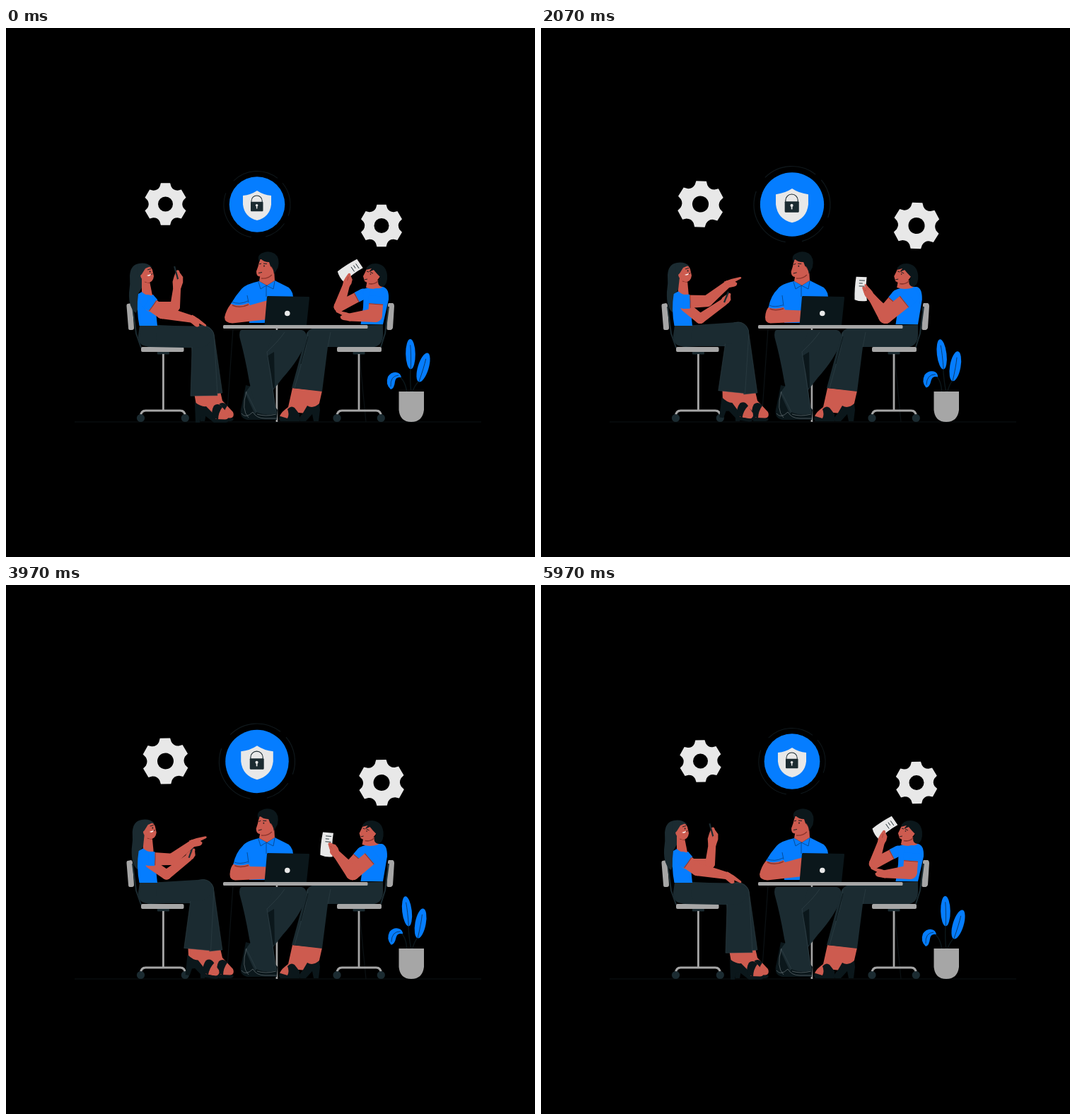
Animation of 748x748 px, one loop 6.01 s. Source, as an HTML page with a canvas:

```html
<!DOCTYPE html>
<html lang="en">
<head>
<meta charset="utf-8">
<title>Security meeting</title>
<style>
html, body { margin: 0; width: 100%; height: 100%; overflow: hidden; background: #000; }
canvas { display: block; width: 748px; height: 748px; }
</style>
</head>
<body>
<canvas id="stage"></canvas>
<script>
const LOOP = 6010, HALF = LOOP / 2, SIZE = 748;
const BLUE = '#057dff', SKIN = '#cd5b4f', SHADE = '#8c342c', SLATE = '#1b2b31', DARK = '#0b171b';
const GREY = '#a6a6a6', LIGHT = '#e8e8e8', SEAM = '#35464c', FAINT = '#0c1215';

const canvas = document.getElementById('stage');
const c = canvas.getContext('2d');
const ratio = window.devicePixelRatio || 1;
canvas.width = canvas.height = SIZE * ratio;

const rad = deg => deg * Math.PI / 180;
const wave = x => (1 - Math.cos(2 * Math.PI * x)) / 2;

function fill(color, d) {
  c.fillStyle = color;
  c.fill(new Path2D(d));
}

function line(color, width, d) {
  c.strokeStyle = color;
  c.lineWidth = width;
  c.stroke(new Path2D(d));
}

function oval(color, x, y, rx, ry = rx) {
  c.fillStyle = color;
  c.beginPath();
  c.ellipse(x, y, rx, ry, 0, 0, 7);
  c.fill();
}

function bar(color, x, y, w, h, r = 0) {
  c.fillStyle = color;
  c.beginPath();
  c.roundRect(x, y, w, h, r);
  c.fill();
}

// Draws in a local frame: moved, turned, scaled.
function at(x, y, deg, draw, sx = 1, sy = sx) {
  c.save();
  c.translate(x, y);
  c.rotate(rad(deg));
  c.scale(sx, sy);
  draw();
  c.restore();
}

function spin(x, y, deg, draw) {
  at(x, y, deg, () => { c.translate(-x, -y); draw(); });
}

// Tapered capsule between two joints.
function limb(color, [ax, ay], ra, [bx, by], rb) {
  const a = Math.atan2(by - ay, bx - ax), q = Math.PI / 2;
  c.fillStyle = color;
  c.beginPath();
  c.arc(ax, ay, ra, a + q, a + 3 * q);
  c.arc(bx, by, rb, a - q, a + q);
  c.fill();
}

function sleeve([sx, sy], [ex, ey], len, r) {
  at(sx, sy, Math.atan2(ey - sy, ex - sx) * 180 / Math.PI, () => {
    oval(BLUE, 0, 0, r);
    bar(BLUE, 0, -r, len, 2 * r);
    line(SHADE, 1, `M${len + .6} ${-r + 1}V${r - 1}`);
  });
}

// Pose between three keys, carried a little past the last one.
const STOPS = [0, .335, .725, 1];
function pose(u, keys) {
  const all = [...keys, keys[2].map((v, i) => v + (v - keys[1][i]) * .35)];
  const i = u < STOPS[1] ? 0 : u < STOPS[2] ? 1 : 2;
  const k = (u - STOPS[i]) / (STOPS[i + 1] - STOPS[i]);
  return all[i].map((v, j) => v + (all[i + 1][j] - v) * k);
}

function gear(x, y, deg, scale) {
  at(x, y, deg, () => {
    const p = (r, a) => `${r * Math.sin(rad(a))} ${-r * Math.cos(rad(a))}`;
    let d = '';
    for (let a = 0; a < 360; a += 60) {
      d += `${a ? 'L' : 'M'}${p(30.4, a - 12.5)}L${p(30.4, a + 12.5)}L${p(26, a + 18)}`;
      d += `Q${p(22, a + 30)} ${p(26, a + 42)}`;
    }
    fill(LIGHT, d + 'Z');
    oval('#000', 0, 0, 10.5);
  }, scale);
}

function badge(scale) {
  at(355, 249.5, 0, () => {
    c.strokeStyle = '#10191d';
    c.lineWidth = 1;
    for (const [from, to] of [[-135, -52], [-40, 20], [35, 75], [100, 200]]) {
      c.beginPath();
      c.arc(0, 0, 47, rad(from), rad(to));
      c.stroke();
    }
    oval(BLUE, 0, 0, 39.3);
    fill(LIGHT, 'M0 -19.500Q-9 -13.500 -20 -12.500V0Q-18 18 0 22.500Q18 18 20 0V-12.500Q9 -13.500 0 -19.500Z');
    line(SLATE, 1, 'M-8 -3V-5A7.6 7.6 0 0 1 7.2 -5V-3');
    bar(SLATE, -9, -3.8, 17.5, 13.6, 1);
    oval(LIGHT, -.4, 1.2, 1.8);
    bar(LIGHT, -1.1, 1.5, 1.5, 4.5);
  }, scale);
}

function plant(u) {
  const leaf = (x, y, deg, rx, ry) => at(x, y, deg, () => {
    oval(BLUE, 0, 0, rx, ry);
    line(DARK, .6, `M0 ${-ry * .6}Q1 0 0 ${ry}`);
  });
  spin(573, 514, -8 * u, () => {
    line(DARK, 1.4, 'M573 516Q571 500 572 482');
    leaf(572, 461, -1, 6.8, 21.3);
  });
  spin(574, 514, -9.5 * u, () => {
    line(DARK, 1.4, 'M574 516Q578 505 584 499');
    leaf(590, 480, 17, 7.6, 21.3);
  });
  spin(566, 514, 9 * u, () => {
    line(DARK, 1.4, 'M567 517Q565 497 553 491');
    fill(BLUE, 'M544 511Q536 504 540 493Q545 486 552 487Q558 488 559 494Q551 493 550 500Q549 510 544 511Z');
    line(DARK, .6, 'M544 507Q543 492 555 491');
  });
  fill(GREY, 'M555.5 514H591V540Q589 557 573 557Q557 557 555.5 540Z');
}

function chair(x, left, right, seatX, seatW) {
  bar(SLATE, x - 8.5, 457, 17, 4.5, 1);
  bar(GREY, x - 1.4, 461, 2.8, 80);
  line(GREY, 3, `M${left} 549Q${left} 541 ${left + 7} 541H${right - 7}Q${right} 541 ${right} 549`);
  oval(SLATE, left, 551.5, 5.6);
  oval(SLATE, right, 551.5, 5.6);
  bar(GREY, seatX, 451, seatW, 7, 2);
}

function pointing() {
  fill(SKIN, 'M-4 -5L7 -5L20 -3.5Q22.5 -2 20 -.8L11 .5L13 3Q12 7 7 6.5L-3 5Z');
}

function palm() {
  fill(SKIN, 'M-4 -5L5 -7L12 -6L20 -4Q23 -1 18 1L13 6L6 7L-4 5Z');
  line(SHADE, .6, 'M8 -1L15 -2');
}

function sandal(x, y, deg) {
  at(x, y, deg, () => {
    fill(SKIN, 'M-14 -4L16 -4L19 9L34 25Q37 32 30 34L16 33L0 20L-11 13Z');
    fill(DARK, 'M-13 9Q-4 16 3 15L12 24L17 33.500H34Q36 37 31 38H14L0 27L-4 28L-6 38H-12Z');
    fill(DARK, 'M14 14Q20 9 26 16Q20 24 20 34L12 30Q10 21 14 14Z');
  });
}

function trouser(knee, r, ankle, half) {
  const a = Math.atan2(ankle[1] - knee[1], ankle[0] - knee[0]);
  const dx = -Math.sin(a), dy = Math.cos(a);
  const p = (q, k) => `${q[0] + dx * k} ${q[1] + dy * k}`;
  const d = `M${p(ankle, half)}L${p(knee, r)}A${r} ${r} 0 0 1 ${p(knee, -r)}L${p(ankle, -half)}Z`;
  fill(SLATE, d);
  line(SEAM, .5, d);
}

function leftWoman(u, v) {
  fill(GREY, 'M172 390L177 389Q179 390 179 393L181 424Q181 427 178 427H175Q173 427 173 424L170.5 393Q170.5 390 172 390Z');
  line(SLATE, 2, 'M179 394L184 432L191 452');
  chair(222.4, 190.5, 253.3, 191, 60.5);

  const knee = [279 - 2 * v, 437 - 18 * v], ankle = [280 - 33 * v, 520 - 17 * v];
  sandal(287, 518, 0);
  trouser([278, 437], 16.5, [287, 518], 19);
  sandal(...ankle, 27 * v);
  fill(SLATE, 'M189 420H215L260 422L268 450H200Q187 450 187 435Z');
  limb(SLATE, [204, 436], 15, knee, 15.5);
  trouser(knee, 15.5, ankle, 19);
  limb(SLATE, [225, 436 - 3 * v], 13, [knee[0] - 4, knee[1]], 14.5);

  const headX = 5.5 * u, headY = -1.5 * u;
  c.save();
  c.translate(headX, headY);
  fill(SLATE, `M188 333Q176 335 175 350Q176 362 174 374Q173 396 ${184 - 3 * u} 403Q190 391 187 376L195 362L198 345L206 338Q199 331 188 333Z`);
  c.restore();

  fill(BLUE, `M${187 + u} 376L${194 + u} 372Q203 378 208 377L214 384L212 402L214 421H188.5Q184 398 ${187 + u} 376Z`);
  c.save();
  c.translate(headX, headY);
  fill(SKIN, `M192 354L203 358L${207 - 3 * u} 378Q${199 - 3 * u} 380 ${192 - 3 * u} 373Z`);
  line(SHADE, 1.2, 'M196 359L203 360.5');
  fill(SKIN, 'M192 340Q203 333 207 342L209 351Q208 360 200 360Q191 357 190 350Z');
  fill(SLATE, 'M186 335Q196 331 204 337L197 340L192 348L187 353Z');
  line(DARK, .9, 'M200 342L205 340.5M207 347L205.5 349');
  oval(DARK, 203.6, 344.5, .9);
  fill('#fff', 'M199 350L205 348Q204 352 199 350Z');
  c.restore();

  const farElbow = pose(u, [[239, 394], [240, 399], [225, 411]]);
  const farWrist = pose(u, [[242, 365], [252, 375], [258, 388]]);
  limb(SKIN, [204, 394], 7, farElbow, 7);
  limb(SKIN, farElbow, 7, farWrist, 5.2);
  const [px, py, qx, qy, turn] = pose(u, [[238, 337, 243, 355, -82], [257, 350, 256, 369, -70], [265, 373, 259, 388, -46]]);
  at(...farWrist, turn, palm, 1.08 - .45 * u, 1.05 - .3 * u);
  line(SLATE, 2.2, `M${px} ${py}L${qx} ${qy}`);

  const shoulder = [200 + 2 * u, 387];
  const elbow = pose(u, [[221, 402], [231, 402], [235, 386]]);
  const wrist = pose(u, [[264, 412], [266, 387], [264, 362]]);
  const [aim] = pose(u, [[32], [-6], [-20]]);
  const thick = 9.2 - 1.5 * u;
  limb(SKIN, shoulder, 9.5, elbow, thick);
  limb(SKIN, elbow, thick, wrist, 5);
  at(...wrist, aim, pointing);
  sleeve(shoulder, elbow, 9, 10);
}

function man(u) {
  fill(DARK, 'M339 505L333 535Q328 551 341 554H383L384 540L360 510Z');
  fill(SLATE, 'M350 427H418Q427 429 424 443Q417 466 391 495L370 522L352 546L338 516L350 500Z');
  fill(DARK, 'M366 466L379 458L380 508L374 512Z');
  fill(SLATE, 'M333 427H378L369 458L375 490L382 545Q367 549 354 543L344 500Q338 465 330.5 438Q329 428 333 427Z');
  line(SEAM, .6, 'M369 458Q386 442 394 430M369 458L374 490L382 544M340 515L354 543');
  line('#667176', .7, 'M340 514Q332 540 343 551M333 545Q339 553 349 543Q354 552 366 552H383M355 546Q367 550 382 546');

  const sx = 2.5 * u;
  const cuffL = `${318 + 5 * u} ${390 + 7 * u}`, cuffR = `343 ${389 + 8 * u}`;
  fill(BLUE, `M358 358Q339 362 ${333 + sx} 369Q325 378 ${cuffL}L${cuffR}L344 417H369V380H406Q405 368 394 364L380 357L369 364Z`);
  fill(SKIN, `M${cuffL}Q${311 + 9 * u} 399 ${309 + 11 * u} 409Q${309 + 11 * u} 417 ${320 + 6 * u} 417.5L370 ${412 + 5 * u}V${385 + 20 * u}L345 ${392 + 9 * u}L${cuffR}Z`);
  fill(BLUE, `M${333 + sx} 372L${cuffL}Q330 ${395 + 5 * u} ${cuffR}V372Z`);
  line(SHADE, 1.6, `M${320 + 5 * u} ${392 + 7 * u}Q331 ${397 + 5 * u} 343 ${391 + 8 * u}`);
  fill(SKIN, 'M360 346L379 341L380 357L369 364L358 358Z');
  line('#08376c', .7, `M341 378L343 ${388 + 7 * u}M${319 + 5 * u} ${387 + 7 * u}Q330 ${392 + 5 * u} 342 ${386 + 8 * u}M368 364V380M357 359L360 369L368 364L378 369L380 358`);
  line(SHADE, 1.4, 'M361 354Q370 355 376 349');
  spin(370, 354, -3 * u, () => {
    fill(SKIN, 'M359 327L356.5 337L354 344Q354 350 357 351Q366 354 374 349L380 337L376 326Z');
    fill(DARK, 'M358 331Q354 321 363 318Q371 314 380 319Q388 325 384.5 339L379 348Q378 339 374 337L372 331Q364 331 360 326Z');
    line(DARK, .9, 'M358 334L361 333M364 333L369 333.5M357 346.5L362 345.5');
    oval(DARK, 365, 336.5, .9);
    line(SHADE, .7, 'M375 337L377 341');
  });
}

function rightLegs() {
  fill(SKIN, 'M405 509L447 513L442 535L424 545L414 544L404 549L396 553L387 549Q389 543 399 536Z');
  fill(DARK, 'M398 539Q403 533 408 537L415 546V556H388Q384 552 388 549L398 552Q401 546 398 539Z');
  fill(DARK, 'M413 553Q421 544 426 534Q434 539 443 531L444 540L442 556H435L433 546L424 556H416Z');
  fill(SLATE, 'M533 419L433 425Q424 427 422 443L404 509L447 514L455 451H521Q534 448 533 430Z');
  line(SEAM, .5, 'M455 451L459 430M427 430L424 452L408 509');
  line(DARK, 1, 'M427 436L417 475');
}

function rightWoman(u) {
  fill(GREY, 'M541 389H547Q549 390 549 393L547 424Q546 427 544 427H540Q538 426 538.5 423L540 392Q540 390 541 389Z');
  line(SLATE, 2, 'M541 394L536 432L530 451');
  chair(499, 468, 530.3, 468, 63);

  const farShoulder = [505 - 2 * u, 376 + 2 * u];
  const farElbow = pose(u, [[471, 394], [484, 391], [485, 400]]);
  const farWrist = pose(u, [[481, 364], [473, 373], [466, 380]]);
  const [px, py, tilt, hand] = pose(u, [[486.5, 342.5, 56, -68], [466, 352.5, 25, -105], [452.5, 369, 2, -122]]);
  limb(SKIN, farShoulder, 7, farElbow, 7.5);
  at(px, py, tilt, () => {
    fill(LIGHT, 'M-7.5 -17H7.5Q6 0 9 16.5Q0 18.5 -8.5 15.5Q-9.5 0 -7.5 -17Z');
    line(SLATE, .9, 'M-3 -12H5M-3 -8H2M-3 -4H5');
  });
  limb(SKIN, farElbow, 7.5, farWrist, 5);
  at(...farWrist, hand, palm, .85);
  sleeve(farShoulder, farElbow, 10, 7.5);

  fill(BLUE, `M${506 - 5 * u} ${369 + u}L515 366H${533 - 2 * u}Q${542 - 4 * u} 368 ${541 - 3 * u} 384L533 419H501.5L505 395Z`);
  c.save();
  c.translate(-8 * u, 0);
  fill(SKIN, 'M511 356L531 357L532 367Q520 371 509 367Z');
  line(SHADE, 1.6, 'M513 361.5Q521 363 526 358');
  fill(SKIN, 'M511 338L508 345L505 351L507 358Q514 363 524 358L530 350L523 337Z');
  fill(DARK, 'M509 342Q511 333 523 333Q537 334 539 349Q540 362 533 366Q526 366 526 358L529 352Q523 346 520 342L513 345L517 340Z');
  line(DARK, .9, 'M510 344L513 345M507 356L511 355M515 345L519 347');
  oval(DARK, 515.5, 348, .8);
  c.restore();

  const shoulder = [524 - 2 * u, 379 + u];
  const elbow = pose(u, [[522, 406], [513, 402], [487, 408]]);
  const wrist = pose(u, [[486, 409], [478, 397], [468, 381]]);
  const [aim] = pose(u, [[198], [217], [236]]);
  limb(SKIN, shoulder, 10, elbow, 10);
  limb(SKIN, elbow, 10, wrist, 5.5);
  at(...wrist, aim, pointing, 1, -1);
  sleeve(shoulder, elbow, 11, 11);
}

function draw(t) {
  const u = wave((t - 40) / HALF);
  const v = t > HALF / 2 && t < LOOP - HALF / 2 ? wave(t / HALF - .5) : 0;
  c.setTransform(ratio, 0, 0, ratio, 0, 0);
  c.fillStyle = '#000';
  c.fillRect(0, 0, SIZE, SIZE);
  c.lineCap = 'butt';
  c.lineJoin = 'round';

  line(FAINT, 1, 'M97 557H672');
  const turn = 180 * t / LOOP, grow = 1 + .137 * u;
  gear(225.5, 249, turn, grow);
  gear(531, 279.5, turn, grow);
  badge(1 + 8 / 39 * u);
  plant(u);

  line(FAINT, 1.2, 'M321 425L313 540M496 425L509 557');
  bar(GREY, 381.6, 425, 2.6, 132);
  leftWoman(u, v);
  man(u);
  rightLegs();
  rightWoman(u);
  fill(DARK, 'M370 379L428 380Q429.5 380 429 382L425 420H365.5L369 380Z');
  oval(LIGHT, 397.8, 403.5, 3.8);
  bar(GREY, 307, 420, 204.5, 5, 1.5);
}

const start = performance.now();
function tick() {
  draw((performance.now() - start) % LOOP);
  requestAnimationFrame(tick);
}
tick();
</script>
</body>
</html>
```
